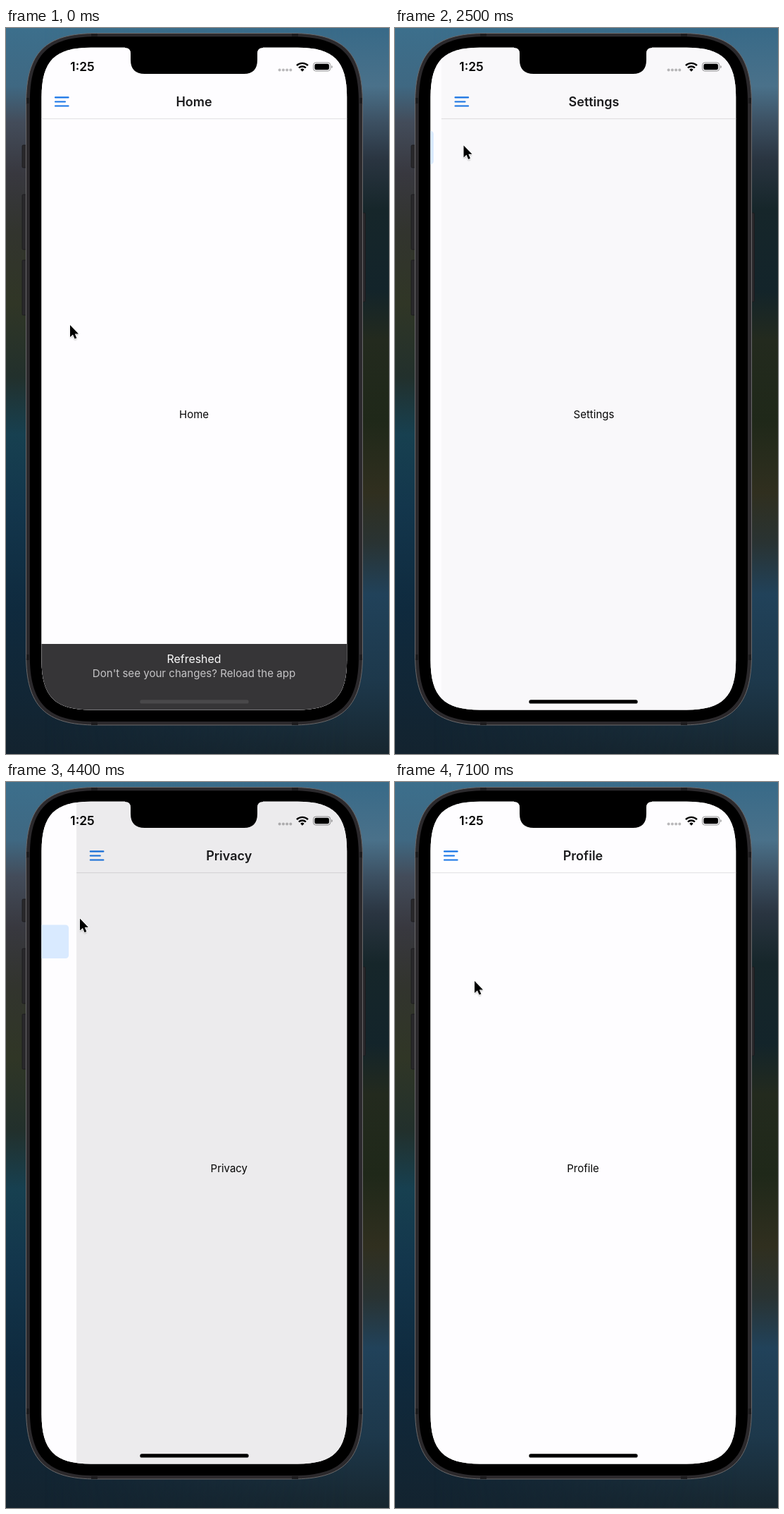
Write an HTML page that moves like this. It is 544 by 1029 pixels and loops after 7.2 s.

```html
<!DOCTYPE html>
<html lang="en">
<head>
<meta charset="utf-8">
<title>Drawer navigation</title>
<style>
  html, body { margin: 0; width: 100%; height: 100%; overflow: hidden; background: #14222e; }
  svg { display: block; width: 100vw; height: 100vh; font-family: Inter, "Liberation Sans", sans-serif; }
  .mid { text-anchor: middle; }
</style>
</head>
<body>
<svg id="stage" viewBox="0 0 544 1029" preserveAspectRatio="none">
  <defs>
    <linearGradient id="left" x2="0" y2="1">
      <stop offset="0" stop-color="#3c6f8c"/><stop offset=".08" stop-color="#3f6882"/>
      <stop offset=".13" stop-color="#434c5a"/><stop offset=".2" stop-color="#38383f"/>
      <stop offset=".28" stop-color="#32342e"/><stop offset=".38" stop-color="#303626"/>
      <stop offset=".48" stop-color="#22302c"/><stop offset=".56" stop-color="#174050"/>
      <stop offset=".66" stop-color="#13364c"/><stop offset=".8" stop-color="#0f2a3e"/>
      <stop offset="1" stop-color="#13232f"/>
    </linearGradient>
    <linearGradient id="right" x2="0" y2="1">
      <stop offset="0" stop-color="#386a88"/><stop offset=".08" stop-color="#4a718a"/>
      <stop offset=".13" stop-color="#3c5062"/><stop offset=".18" stop-color="#2a3541"/>
      <stop offset=".25" stop-color="#16262a"/><stop offset=".36" stop-color="#13242a"/>
      <stop offset=".43" stop-color="#232a1e"/><stop offset=".54" stop-color="#1f2819"/>
      <stop offset=".64" stop-color="#302f1f"/><stop offset=".71" stop-color="#293333"/>
      <stop offset=".78" stop-color="#21425a"/><stop offset=".9" stop-color="#1d384b"/>
      <stop offset="1" stop-color="#17262f"/>
    </linearGradient>
    <linearGradient id="across"><stop offset=".1" stop-color="#000"/><stop offset=".9" stop-color="#fff"/></linearGradient>
    <mask id="blend"><rect width="544" height="1029" fill="url(#across)"/></mask>
    <clipPath id="screen"><path id="screenShape"/></clipPath>
    <filter id="soft" x="-50%" y="-50%" width="200%" height="200%"><feGaussianBlur stdDeviation="1.2"/></filter>
  </defs>

  <rect width="544" height="1029" fill="url(#left)"/>
  <rect width="544" height="1029" fill="url(#right)" mask="url(#blend)"/>

  <g fill="#29282b" stroke="#1b1a1d" stroke-width=".8">
    <rect x="23" y="166" width="8" height="32" rx="1.5"/>
    <rect x="23" y="236" width="8" height="78" rx="1.5"/>
    <rect x="23" y="329" width="8" height="78" rx="1.5"/>
    <rect x="503" y="262" width="7.5" height="126" rx="1.5"/>
  </g>
  <path id="body" fill="#2b292c" stroke="#6a696b"/>
  <path id="bezel"/>
  <path d="M121 10h9M406 10h9M121 986h9M406 986h9M31 99v8M504 99v8M31 888v8M504 888v8" stroke="#1d1c1e" stroke-width="4"/>

  <g clip-path="url(#screen)">
    <rect x="50" y="27" width="436" height="941" fill="#fefdff"/>
    <g id="page">
      <rect x="50" y="27" width="435" height="941" fill="#fefdff"/>
      <path d="M50 128.7H485" stroke="#e0dfe2"/>
      <path id="menu" d="M70 98.4H88.6M70 104.5H84M70 110.5H88.6" stroke="#1674e6" stroke-width="2.1" stroke-linecap="round"/>
      <text id="title" class="mid" x="267" y="111" font-size="18" font-weight="600" fill="#1c1c1e"></text>
      <text id="label" class="mid" x="267" y="553" font-size="15" fill="#050505"></text>
      <rect id="dim" x="50" y="27" width="435" height="941"/>
    </g>
    <g id="drawer">
      <rect x="50" y="27" width="311" height="941" fill="#fefdff"/>
      <rect id="active" x="61" y="89" width="289" height="47.7" rx="4.5" fill="#d9eaff"/>
      <g id="items" font-size="15.2" font-weight="500"></g>
    </g>
    <g id="banner">
      <rect x="50" y="873" width="435" height="95" fill="#363537"/>
      <text class="mid" x="267" y="900" font-size="15.9" fill="#fbfbfb">Refreshed</text>
      <text class="mid" x="267" y="919.6" font-size="15.1" fill="#c5c4c6">Don't see your changes? Reload the app</text>
    </g>
    <rect id="homeBar" x="190.3" y="952.2" width="154.4" height="5.4" rx="2.7"/>

    <text class="mid" x="108.5" y="61.4" font-size="17.4" font-weight="600">1:25</text>
    <g opacity=".27">
      <circle cx="388.6" cy="59.6" r="2"/><circle cx="393.9" cy="59.6" r="2"/>
      <circle cx="399.1" cy="59.6" r="2"/><circle cx="404.3" cy="59.6" r="2"/>
    </g>
    <g fill="none" stroke="#000" stroke-width="2.4">
      <path d="M412.9 53.2a11.4 11.4 0 0 1 16 0M415.9 56.5a7.1 7.1 0 0 1 10 0"/>
      <path d="M420.9 61.8l-2.7-2.9a3.9 3.9 0 0 1 5.4 0z" fill="#000" stroke="none"/>
    </g>
    <rect x="436.5" y="49" width="24.2" height="12" rx="3.6" fill="none" stroke="#000" stroke-opacity=".42"/>
    <rect x="438.3" y="50.8" width="20.6" height="8.4" rx="2.2"/>
    <path d="M462.2 53v4.2q1.5-.5 1.5-2.1t-1.5-2.1z" opacity=".45"/>
  </g>
  <path d="M169 26V28Q177 28 177 36V45Q177 65 197 65H338Q357 65 357 45V36Q357 28 365 28V26Z"/>

  <g id="cursor">
    <path d="M0 0V17L4 13.4 6.6 19.6 9.4 18.4 6.8 12.4H12Z" transform="translate(0 1.6)" opacity=".4" filter="url(#soft)"/>
    <path d="M0 0V17L4 13.4 6.6 19.6 9.4 18.4 6.8 12.4H12Z" stroke="#fff" stroke-width="1.8" stroke-linejoin="round" paint-order="stroke"/>
  </g>
</svg>

<script>
const LOOP = 7200, STEP = 100;
const WIDTH = 310.7, ROW = 56.7;
const screens = ["Home", "Settings", "Privacy", "Profile"];
const opens = [1390, 3290, 5090];
const closes = [2240, 4220, 5950];
// start, end, target x, target y
const moves = [
  [0, 1300, 71, 98],
  [1420, 2000, 99, 172],
  [2400, 3000, 79, 97],
  [3400, 4050, 113, 226],
  [4150, 4900, 82, 101],
  [5130, 5800, 113, 282]
];

const $ = id => document.getElementById(id);
const clamp = v => Math.min(1, Math.max(0, v));
const smooth = v => v * v * (3 - 2 * v);
const shift = (id, x, y) => $(id).setAttribute("transform", `translate(${x} ${y})`);

// Rounded box with continuous corners
function squircle(l, t, r, b, radius) {
  const a = radius * 1.3, c = radius * 0.35;
  return `M${l} ${t + a}C${l} ${t + c} ${l + c} ${t} ${l + a} ${t}` +
    `H${r - a}C${r - c} ${t} ${r} ${t + c} ${r} ${t + a}` +
    `V${b - a}C${r} ${b - c} ${r - c} ${b} ${r - a} ${b}` +
    `H${l + a}C${l + c} ${b} ${l} ${b - c} ${l} ${b - a}Z`;
}

// Critically damped spring, 0 to 1
function spring(ms) {
  if (ms <= 0) return 0;
  const k = Math.sqrt(1000 / 3) * ms / 1000;
  return 1 - (1 + k) * Math.exp(-k);
}

function drawerAt(t) {
  let p = 0;
  opens.forEach((open, i) => {
    if (t >= open) p = t < closes[i] ? spring(t - open) : 1 - spring(t - closes[i]);
  });
  return p;
}

function cursorAt(t) {
  let x = 91, y = 421;
  for (const [start, end, tx, ty] of moves) {
    const u = smooth(clamp((t - start) / (end - start)));
    x += (tx - x) * u;
    y += (ty - y) * u;
  }
  return [x, y];
}

function menuOpacity(t) {
  let o = 1;
  for (const open of opens) {
    if (t >= open - 140) o = 0.35 + 0.65 * clamp((t - open) / 200);
  }
  return o;
}

function draw(now) {
  const t = Math.floor(now % LOOP / STEP) * STEP;
  const current = closes.filter(c => t >= c).length;
  const p = drawerAt(t);

  $("title").textContent = $("label").textContent = screens[current];
  shift("page", WIDTH * p, 0);
  shift("drawer", WIDTH * (p - 1), 0);
  $("dim").setAttribute("opacity", 0.54 * Math.pow(p, 1.1));
  $("menu").setAttribute("opacity", menuOpacity(t));

  shift("active", 0, ROW * current);
  [...$("items").children].forEach((item, i) =>
    item.setAttribute("fill", i === current ? "#1674e6" : "#58575a"));

  const slide = 152 * smooth(clamp((t - 200) / 350));
  shift("banner", 0, slide);
  $("homeBar").setAttribute("fill", slide < 75 ? "#49484a" : "#000");

  shift("cursor", ...cursorAt(t));
}

$("screenShape").setAttribute("d", squircle(50.5, 27.7, 484.2, 966.5, 54));
$("body").setAttribute("d", squircle(28.5, 7.5, 506.5, 988, 77));
$("bezel").setAttribute("d", squircle(33.8, 12.3, 501, 983, 72));
$("items").innerHTML = screens
  .map((name, i) => `<text x="69.5" y="${118.5 + ROW * i}">${name}</text>`).join("");

let begin;
function tick(now) {
  begin ??= now;
  draw(now - begin);
  requestAnimationFrame(tick);
}
draw(0);
requestAnimationFrame(tick);
</script>
</body>
</html>
```
